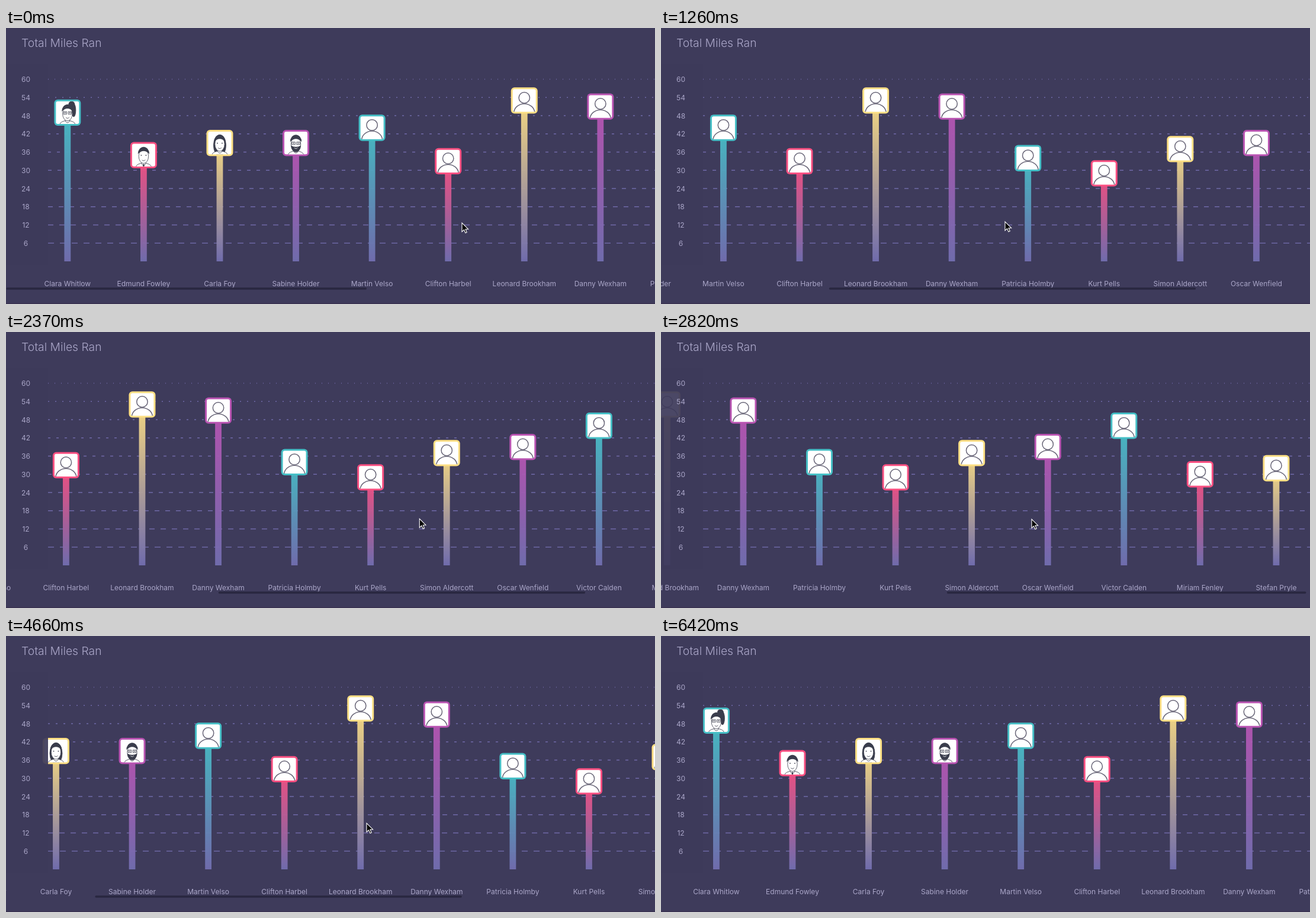
Write an HTML page with a canvas that moves like this. It is 1096 px wide and 466 px high and loops after 8.05 s.

```html
<!DOCTYPE html>
<html lang="en">
<head>
<meta charset="utf-8">
<title>Total Miles Ran</title>
<style>
  html, body { margin: 0; width: 100%; height: 100%; overflow: hidden; background: #3e3b5b; }
  canvas { display: block; width: 1096px; height: 466px; }
</style>
</head>
<body>
<canvas id="stage"></canvas>
<script>
const W = 1096, H = 466, LOOP = 8050;
const BASE = 394, UNIT = 5.125, GAP = 128.57, MAX_SCROLL = 840;
const BG = '#3e3b5b', INK = '#3a3d4c', WHITE = '#fff';
const FONT = 'Inter, "Open Sans", sans-serif';
const COLORS = ['#45bfc6', '#fb4f81', '#fddf83', '#b953b2'];

const runners = [
  ['Clara Whitlow', 49], ['Edmund Fowley', 35], ['Carla Foy', 39],
  ['Sabine Holder', 39], ['Martin Velso', 44], ['Clifton Harbel', 33],
  ['Leonard Brookham', 53], ['Danny Wexham', 51], ['Patricia Holmby', 34],
  ['Kurt Pells', 29], ['Simon Aldercott', 37], ['Oscar Wenfield', 39],
  ['Victor Calden', 46], ['Miriam Fenley', 30], ['Stefan Pryle', 32]
];
const portraits = [
  { ponytail: true, glasses: true }, { tie: true },
  { longHair: true }, { glasses: true, beard: true }
];

// Pointer strokes: start, end, dx, dy
const strokes = [
  [650, 1260, -189, -2], [1400, 1880, 142, -12], [2150, 2820, -97, 1],
  [2820, 3260, -17, 0], [3290, 3590, -281, 12], [3590, 3900, 281, -12],
  [6180, 6420, 315, -54]
];

const canvas = document.getElementById('stage');
const g = canvas.getContext('2d');
const dpr = window.devicePixelRatio || 1;
canvas.width = W * dpr;
canvas.height = H * dpr;

function ease(t, from, to) {
  const u = Math.min(1, Math.max(0, (t - from) / (to - from)));
  return u * u * (3 - 2 * u);
}
const glide = t => t > 0 ? 1 - Math.exp(-t / 317) : 0;
const bounce = t => t > 0 ? 22 * (t / 100) * Math.exp(1 - t / 100) : 0;

// Two flings to the right end and one back, with rubber-band ends
function scrollAt(t) {
  const first = 618;
  return first * glide(t - 730)
    + (MAX_SCROLL - first) * ease(t, 2300, 2680) + bounce(t - 2610)
    - MAX_SCROLL * ease(t, 4030, 5040) - bounce(t - 4980) - bounce(t + 275);
}

function pointerAt(t) {
  return strokes.reduce(([x, y], [from, to, dx, dy]) => {
    const e = ease(t, from, to);
    return [x + dx * e, y + dy * e];
  }, [770, 329]);
}

function text(str, x, y, size, align = 'center', weight = 400) {
  g.font = `${weight} ${size}px ${FONT}`;
  g.textAlign = align;
  g.fillText(str, x, y);
}

function box(x, y, w, h, r, color) {
  g.fillStyle = color;
  g.beginPath();
  g.roundRect(x, y, w, h, r);
  g.fill();
}

function oval(x, y, rx, ry, color = INK) {
  g.fillStyle = color;
  g.beginPath();
  g.ellipse(x, y, rx, ry, 0, 0, Math.PI * 2);
  g.fill();
  g.stroke();
}

// Half an ellipse closed by a curve: a hairline or a beard edge
function crescent(y, rx, ry, bend, top) {
  g.fillStyle = INK;
  g.beginPath();
  g.ellipse(0, y, rx, ry, 0, Math.PI, 0, !top);
  g.quadraticCurveTo(0, bend, -rx, y);
  g.fill();
}

function drawPortrait({ ponytail, glasses, tie, longHair, beard }) {
  g.strokeStyle = INK;
  g.lineWidth = 0.8;
  if (ponytail) {
    oval(7, -14, 5, 5);
    oval(10.5, -4, 3.5, 11);
  }
  if (longHair) oval(0, 4, 10.5, 18);
  oval(0, 20, 13, 6.5, WHITE);
  oval(0, 12, 4, 5, WHITE);
  oval(0, 2, 8.2, 12, WHITE);
  if (beard) crescent(4, 8.4, 11.5, 9, false);
  crescent(-2, 9.8, 12, -12, true);
  if (tie) box(-1.2, 15, 2.4, 5, 1, INK);

  for (const x of [-4, 4]) {
    if (glasses) g.strokeRect(x - 2.7, -1.5, 5.4, 4);
    box(x - 1, -0.3, 2, 1.3, 0.6, INK);
  }
  g.strokeStyle = beard ? WHITE : INK;
  g.beginPath();
  g.arc(0, 6, 3.5, 0.6, 2.5);
  g.stroke();
}

function drawOutline() {
  g.strokeStyle = '#696678';
  g.lineWidth = 1.5;
  g.beginPath();
  g.arc(0, -4.6, 9.2, 0, Math.PI * 2);
  g.stroke();
  g.beginPath();
  g.ellipse(0, 21, 17.5, 15.5, 0, Math.PI, 0);
  g.stroke();
}

function drawBar(i, x) {
  const y = BASE - runners[i][1] * UNIT, color = COLORS[i % COLORS.length];
  const fade = g.createLinearGradient(0, y, 0, BASE);
  fade.addColorStop(0, color);
  fade.addColorStop(1, '#726eb0');
  g.globalAlpha = 0.95;
  g.fillStyle = fade;
  g.fillRect(x - 5.4, y, 10.8, BASE - y);
  g.globalAlpha = 1;

  box(x - 22.5, y - 22.2, 45, 44.4, 6, color);
  box(x - 19.5, y - 19.2, 39, 38.4, 3, WHITE);
  g.save();
  g.clip();
  g.translate(x, y);
  if (portraits[i]) drawPortrait(portraits[i]);
  else drawOutline();
  g.restore();
}

function drawGrid() {
  g.strokeStyle = '#6f69a8';
  g.lineWidth = 1.4;
  for (let n = 0; n < 10; n++) {
    const y = 86.5 + n * 6 * UNIT;
    g.setLineDash([n + 1, 10]);
    g.beginPath();
    g.moveTo(71, y);
    g.lineTo(W, y);
    g.stroke();
  }
  g.setLineDash([]);
}

function drawThumb(s) {
  const x = Math.max(0.5, s * 0.565);
  const end = Math.min(1089.5, 619.5 + (s < 0 ? s : s * 0.565));
  box(x, 438.2, end - x, 3.5, 1.75, '#292740');
}

const arrow = new Path2D('M0 0V15L3.5 11.7L5.9 17L8.2 16L6 10.7H10.6Z');
function drawPointer(x, y) {
  g.save();
  g.translate(x, y);
  g.fillStyle = '#000';
  g.strokeStyle = WHITE;
  g.lineWidth = 1.1;
  g.fill(arrow);
  g.stroke(arrow);
  g.restore();
}

function draw(t) {
  const s = scrollAt(t);
  const shown = runners
    .map(([name], i) => ({ name, i, x: 93.4 + i * GAP - s }))
    .filter(({ x }) => x > -80 && x < W + 80);

  g.setTransform(dpr, 0, 0, dpr, 0, 0);
  g.fillStyle = BG;
  g.fillRect(0, 0, W, H);
  g.fillStyle = '#393250';
  g.fillRect(0, 464.5, W, 1.5);

  drawGrid();
  for (const { i, x } of shown) drawBar(i, x);

  // Bars fade out behind the axis
  g.globalAlpha = 0.93;
  g.fillStyle = BG;
  g.fillRect(0, 60, 71, 340);
  g.globalAlpha = 1;

  g.fillStyle = '#aaa6c8';
  text('Total Miles Ran', 26, 32, 19.3, 'left', 300);
  for (let n = 0; n < 10; n++) text(60 - n * 6, 33.5, 91 + n * 6 * UNIT, 12);
  for (const { name, x } of shown) text(name, x, 436.3, 12);

  const scrolling = t < 590 || (t >= 730 && t < 3260) || (t >= 4070 && t < 5980);
  if (scrolling) drawThumb(s);
  if (t < 6420) drawPointer(...pointerAt(t));
}

function loop() {
  draw(performance.now() % LOOP);
  requestAnimationFrame(loop);
}
loop();
</script>
</body>
</html>
```
